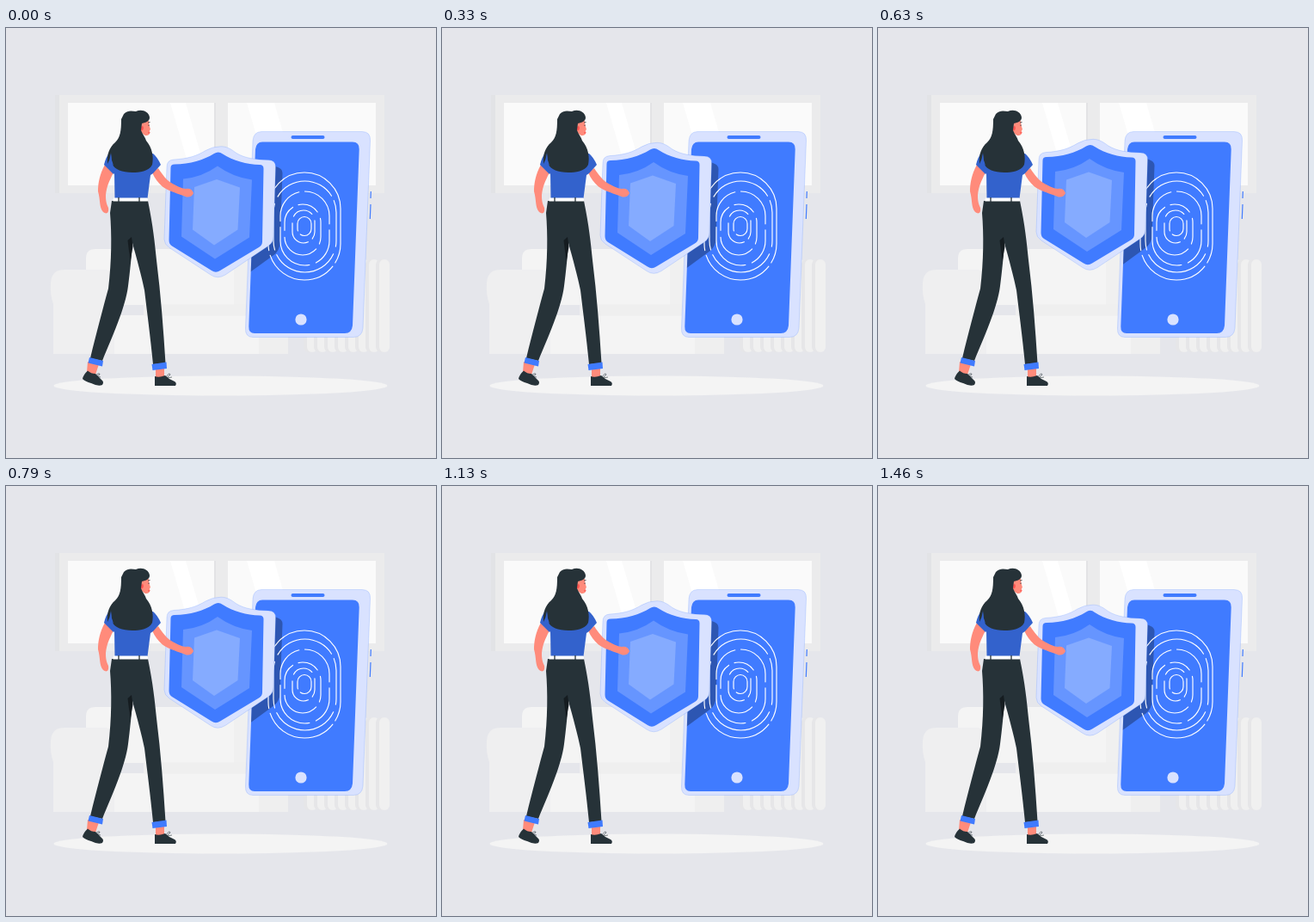
An HTML page for the animation above (1500 ms loop, 500 by 500 pixels).

```html
<!DOCTYPE html>
<html lang="en">
<head>
<meta charset="utf-8">
<title>Shield and phone</title>
<style>
  html, body { margin: 0; width: 100%; height: 100%; overflow: hidden; background: #e5e6eb; }
  svg { display: block; width: 100%; height: 100%; }
</style>
</head>
<body>
<svg viewBox="0 0 500 500">
  <defs>
    <clipPath id="screenClip"><use href="#screen"/></clipPath>
  </defs>

  <ellipse cx="249.5" cy="416" rx="194" ry="11.5" fill="#f4f4f4"/>

  <g id="window">
    <path fill="#e2e3e6" d="M57 78H62V192H57Z"/>
    <path fill="#ebebec" d="M62 78H440V192H62Z"/>
    <path fill="#fafafa" d="M72 87H242V183H72ZM258 87H430V183H258Z"/>
    <path fill="#e3e3e5" d="M242 87H244V183H242Z"/>
    <path fill="#fff" d="M191 87H209L237 183H219ZM280 87H312L340 183H308Z"/>
  </g>

  <g id="sofa">
    <path fill="#f4f4f4" d="M93 281V268Q93 257 104 257H272V322H93Z"/>
    <path fill="#f0f0f0" d="M265 257H285V322H265Z"/>
    <path fill="#f4f4f4" d="M110 334H294V379H110Z"/>
    <path fill="#efefef" d="M160 321.500H300V334.500H160ZM286 321H328V379H294V334Z"/>
    <path fill="#efeff0" d="M55 379V321Q51 310 52 296Q53 281 68 281H114Q126 281 126 293V379Z"/>
  </g>

  <g id="radiator"></g>

  <g id="phone">
    <path fill="#d9e2ff" stroke="#407bff" stroke-width=".2" d="M297 120.500H414Q424 120.500 423.500 131L415 349Q414 359.500 404 359.500H287Q278 359.500 278.500 349L287 131Q288 120.500 297 120.500Z"/>
    <path id="screen" fill="#407bff" d="M298 132.500H403Q411 132.500 410.700 141L403 346Q402 355 394 355H289Q282 355 282.300 347L290 141Q291 132.500 298 132.500Z"/>
    <rect x="331.500" y="125" width="39" height="4" rx="2" fill="#407bff"/>
    <circle cx="343" cy="339" r="6.600" fill="#d9e2ff"/>
    <path fill="none" stroke="#407bff" stroke-width="1.200" d="M424.300 190L424 198M424 205L423.300 222"/>
  </g>

  <g clip-path="url(#screenClip)">
    <path class="float" fill="#000" opacity=".3" d="M305 158L315 162Q322 164 321.500 170L318.500 251Q318 259 312 264L279 288V245Z"/>
  </g>

  <g id="print" fill="none" stroke="#fff" stroke-width="1.150" stroke-linecap="round"></g>

  <g class="float">
    <path fill="#d9e2ff" stroke="#407bff" stroke-width=".2" d="M250 138.200C257 138.200 262 141.500 268 146C278 152 290 153.500 305 154Q313.500 154 313.500 162L311 243Q311 250 305 254L255 287.500Q246 293 238 287.500L190 256Q184 252 184 246L187 162Q187 154 195 153.500C212 152.500 222 149 232 143Q240 138.200 250 138.200Z"/>
    <path fill="#407bff" d="M242 146.500Q247 143 252 147C264 155 280 159 295 159.500Q299.500 159.500 299.500 164L298 249Q298 253 294 255.500L249 282.500Q244 286 239 282.500L193 254Q189.500 252 189.500 247L191.500 163Q191.500 159 196 159C214 159 230 154 242 146.500Z"/>
    <path fill="#6695ff" d="M246 161Q264 174 286 177L283 244L243 269L204 243L206 176Q228 174 246 161Z"/>
    <path fill="#85abff" d="M245 176.500L272 186L269.500 235L242 253L217 235L219 185.500Z"/>
  </g>

  <g id="woman">
    <path fill="#ff8b7b" d="M95 388L108 391L104 403L94 400ZM174 395L184 394V406H174Z"/>
    <g fill="#263238">
      <path d="M123 201H165C171 230 173 250 175 270C180 310 183 350 185.500 390L171 391C168 360 164 330 161 305C158 290 152 268 147 250C146 265 144 285 142 300C139 325 123 360 112 387L98 384C105 355 113 325 119 303C123 270 123 240 121 215Z"/>
      <path d="M95 398.500Q90 403 89 408Q92 411 99 413Q107 417 112 415Q114 412 112 410Q108 406 104 402Q99 402 95 398.500Z"/>
      <path d="M173 405V416H197Q199 413 196 411Q190 409 185 404Q178 407 173 405Z"/>
    </g>
    <path fill="#151c20" d="M141.500 247L146 243L147.500 254L144.500 272Z"/>
    <path fill="none" stroke="#263238" stroke-width=".6" d="M104 404Q109 400 109 403L105 405L110 406M186 406Q190 400 191 403L187 407L193 406"/>
    <path fill="#407bff" d="M97 383L113 387L112 393.500L95.500 389.500ZM169.500 391L186.500 388.500L187 396L170.500 398Z"/>
    <path fill="#ff8b7b" d="M115 159C109 170 107 180 107 190C110 200 108 208 113 214C117 217 120 215 119 209C116 203 116 198 116 194C117 184 120 178 125 168Z"/>
    <path fill="#ff8b7b" d="M170 168L177 163C182 171 187 177 192 180C199 184 205 187 209 187Q216 186 218 192Q216 197 210 196.500C200 192.500 190 190 182 184.500C177 180 173 175 170 168Z"/>
    <path fill="#3362cc" d="M121 144Q116 150 114 159L125 170L126 169L126.500 198H164.500L168 171L171 169L180 159Q176 150 171 146Z"/>
    <path fill="#fff" d="M125 197.500H164.500L165 201.500H124.500Z"/>
    <path fill="none" stroke="#263238" stroke-width="1.300" d="M131 197V202M155 197V202"/>
    <path fill="#ff8b7b" d="M155 111L166 107.500L166.500 113L168 118L167 119L167 123Q165 126 161 124.500L155 120Z"/>
    <path fill="#ff5652" d="M157 115Q160 112 160 117Q159 120 157 119ZM165 121L168 121.500L166 123Z"/>
    <path fill="none" stroke="#263238" stroke-width=".8" d="M165 110L167.500 109.500M166 112.500V114"/>
    <path fill="#263238" d="M137 100C142 95 147 97 151 97C158 94 166 97 167 104C167 108 163 110 158 111L157 119C159 124 162 127 163 131C170 139 172 150 170 159C166 167 155 168 147 168C135 168 126 164 124 159Q122 153 122 146Q121 153 118 158C117 147 120 139 127 133C133 127 134 120 134 106Z"/>
    <path fill="#3362cc" d="M122 145Q122 153 125 160L121 156Z"/>
  </g>
</svg>
<script>
  const $ = id => document.getElementById(id);

  function add(parent, tag, attrs) {
    const el = document.createElementNS('http://www.w3.org/2000/svg', tag);
    for (const key in attrs) el.setAttribute(key, attrs[key]);
    parent.append(el);
  }

  for (let x = 350; x <= 434; x += 12) {
    add($('radiator'), 'rect', { x: x - 4, y: 269, width: 13, height: 108, rx: 6, fill: '#e6e6e8' });
    add($('radiator'), 'rect', { x, y: 269, width: 12, height: 108, rx: 6, fill: '#f0f0f0' });
  }

  // Half width, half height, centre x, centre y, dashes, dash offset
  const rings = [
    [42, 62.5, 347, 230.5, '150 5 90 6', 20],
    [36.5, 53, 347.5, 231, '82 6 54 9', 45],
    [28.5, 43, 347.5, 233, '66 7 44 8', 12],
    [21, 29.5, 345, 234.5, '50 8 30 7', 30],
    [13, 19, 346, 231, '36 8 22 6', 25],
    [8, 11, 347, 230.5, '40 5', 4]
  ];
  for (const [w, h, cx, cy, dash, offset] of rings) {
    add($('print'), 'rect', {
      x: cx - w, y: cy - h, width: 2 * w, height: 2 * h, rx: w,
      'stroke-dasharray': dash, 'stroke-dashoffset': offset
    });
  }

  const LOOP = 1500, LIFT = 10, LEAD = 35;
  const floating = document.querySelectorAll('.float');

  function draw(now) {
    const phase = ((now + LEAD) % LOOP) / LOOP;
    const y = -LIFT * (1 - Math.abs(1 - 2 * phase));
    for (const el of floating) el.setAttribute('transform', `translate(0 ${y})`);
    requestAnimationFrame(draw);
  }
  draw(0);
</script>
</body>
</html>
```
